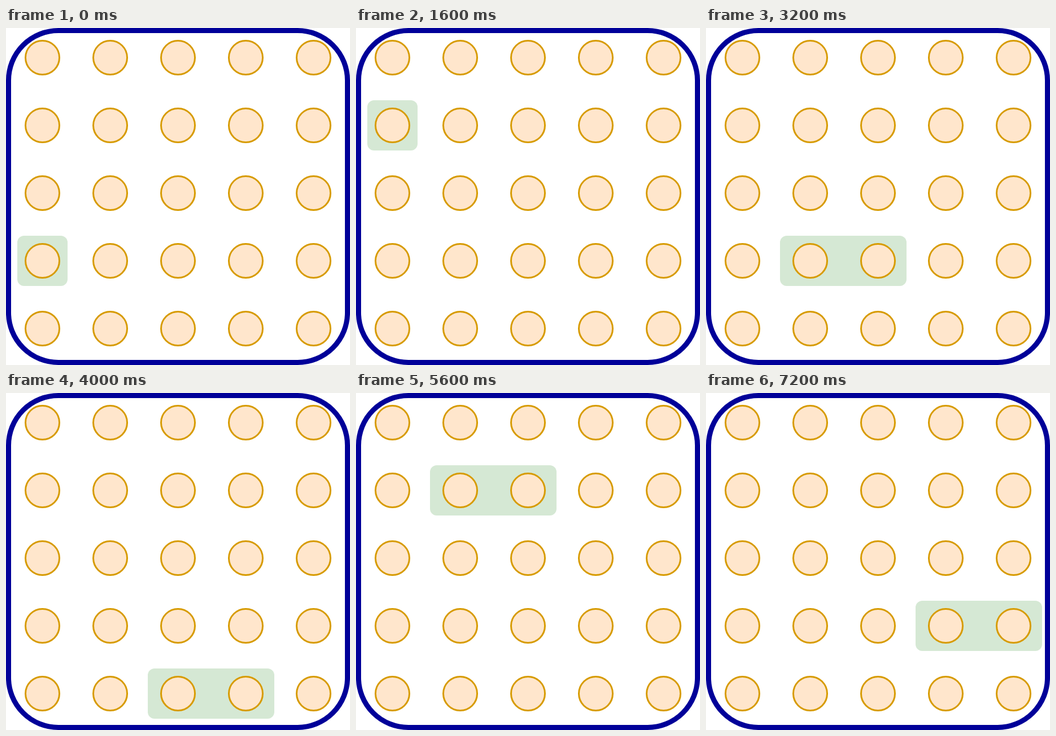
Recreate the animation shown at these times as an HTML page. Size 609 px wide and 597 px high, loop 8 s.

```html
<!DOCTYPE html>
<html lang="en">
<head>
<meta charset="utf-8">
<title>Sliding window over a grid</title>
<style>
  html, body { margin: 0; height: 100%; overflow: hidden; background: #fff; }
  svg { display: block; }
</style>
</head>
<body>
<svg width="609" height="597" viewBox="0 0 609 597">
  <rect x="4.5" y="4.5" width="600" height="588" rx="88.2" fill="#fff" stroke="#009" stroke-width="9"/>
  <rect id="tile" height="89" rx="12" fill="#d5e8d4"/>
  <g id="grid" fill="#ffe6cc" stroke="#d79b00" stroke-width="3"></g>
</svg>
<script>
const STEP = 800, PITCH = 120, SINGLE = 89, DOUBLE = 224;

// Left, top and width of the highlight at each step
const row = r => 8 + r * PITCH;
const pair = c => 11 + c * PITCH;
const steps = [
  [20, row(3), SINGLE],
  [10, row(4) + 1, DOUBLE],
  [20, row(1), SINGLE],
  [pair(0), row(2), DOUBLE],
  [pair(1), row(3), DOUBLE],
  [pair(2), row(4), DOUBLE],
  [16, row(0) - 1, DOUBLE],
  [pair(1), row(1), DOUBLE],
  [pair(2), row(2), DOUBLE],
  [pair(3), row(3), DOUBLE],
];

const tile = document.getElementById('tile');
const grid = document.getElementById('grid');

for (let i = 0; i < 25; i++) {
  const dot = document.createElementNS(grid.namespaceURI, 'circle');
  dot.setAttribute('cx', 64.5 + (i % 5) * PITCH);
  dot.setAttribute('cy', 52.5 + Math.floor(i / 5) * PITCH);
  dot.setAttribute('r', 30);
  grid.append(dot);
}

function draw() {
  const [x, y, width] = steps[Math.floor(performance.now() / STEP) % steps.length];
  tile.setAttribute('x', x);
  tile.setAttribute('y', y);
  tile.setAttribute('width', width);
  requestAnimationFrame(draw);
}
draw();
</script>
</body>
</html>
```
